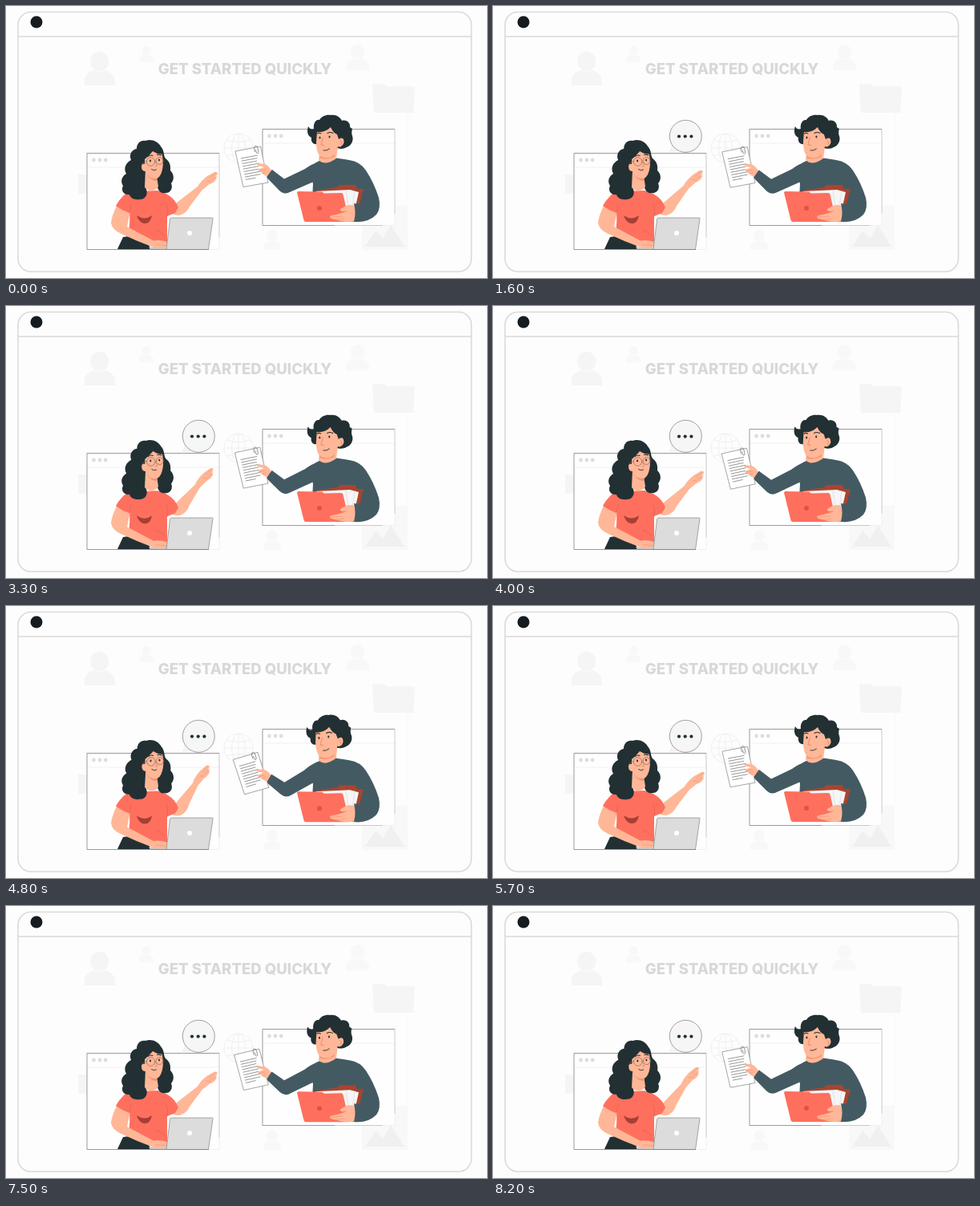
Recreate the animation shown at these times as an HTML page. Size 600 by 339 pixels, loop 8300 ms.

```html
<!DOCTYPE html>
<html lang="en">
<head>
<meta charset="utf-8">
<title>Get started quickly</title>
<style>
  html, body { margin: 0; width: 100%; height: 100%; overflow: hidden; background: #fdfdfd; }
  svg { display: block; width: 600px; height: 339px; }
  .title { font: 800 18.600px Inter, "Open Sans", sans-serif; fill: #d8d8d8; text-anchor: middle; }
  .ghost { fill: #f5f5f5; }
  .hair { fill: #223033; }
  .skin { fill: #ffb797; }
  .red { fill: #ff6f5e; }
  .knit { fill: #435a62; }
  .ink { fill: none; stroke: #263238; stroke-width: .7; stroke-linecap: round; stroke-linejoin: round; }
  .fold { fill: none; stroke: #d95f50; stroke-width: .6; stroke-linecap: round; }
  .shade { fill: none; stroke: #ee9574; stroke-width: .7; stroke-linecap: round; stroke-linejoin: round; }
  .edge { fill: none; stroke: #808080; stroke-width: .8; }
  .pale { fill: none; stroke: #ececec; stroke-width: .8; }
</style>
</head>
<body>
<svg viewBox="0 0 600 339">
  <defs>
    <symbol id="user" viewBox="0 0 40 42" preserveAspectRatio="none">
      <circle cx="20" cy="12" r="12"/>
      <path d="M0 42V35Q2 26 13 23Q20 27 27 23Q38 26 40 35V42Z"/>
    </symbol>
    <g id="pane">
      <rect width="165" height="120" fill="#fefefe"/>
      <path class="pale" d="M0 17.5H165"/>
      <path class="edge" d="M165 0H0V120H90"/>
      <path class="edge" stroke-opacity=".5" d="M90 120H150M165 0V105"/>
      <path class="pale" d="M165 105V120H150"/>
      <g fill="#dedede">
        <circle cx="8.500" cy="8.500" r="2.400"/><circle cx="16" cy="8.500" r="2.400"/><circle cx="23.200" cy="8.500" r="2.400"/>
      </g>
    </g>
  </defs>

  <rect width="600" height="339" fill="#fdfdfd"/>
  <g fill="none" stroke="#dadada" stroke-width="1.600">
    <rect x="15" y="7.500" width="565.500" height="323.500" rx="16"/>
    <path d="M15 38H580"/>
  </g>
  <circle cx="38" cy="20" r="7.500" fill="#151b1f"/>

  <g class="ghost">
    <use href="#user" x="97.500" y="57" width="38.500" height="42"/>
    <path d="M457 99Q457 97 459 97H472L475 100H508Q510 100 510 102L508 133H459Z"/>
    <rect x="90" y="210" width="12" height="24"/>
    <g opacity=".6">
      <use href="#user" x="166" y="50" width="18" height="20"/>
      <use href="#user" x="424" y="48" width="29" height="32"/>
      <use href="#user" x="321" y="279" width="22" height="25"/>
      <rect x="444" y="249" width="57" height="55"/>
    </g>
    <path fill="#f0f0f0" d="M448 300L461 280L470 290L480 273L497 300Z"/>
  </g>
  <path class="pale" opacity=".4" d="M501 133V249"/>
  <g class="pale">
    <circle cx="290" cy="177" r="18"/><ellipse cx="290" cy="177" rx="8.500" ry="18"/>
    <path d="M290 159V195M272 177H308M275 167Q290 172 305 167M275 187Q290 182 305 187"/>
  </g>

  <text class="title" x="298" y="85">GET STARTED QUICKLY</text>

  <use href="#pane" x="101" y="183.500"/>
  <use href="#pane" x="320" y="153.500"/>

  <g id="bubble">
    <path fill="#f5f5f5" stroke="#e2e2e2" stroke-width=".6" d="M223 173Q224 178 220.500 181Q227 182 232 179Z"/>
    <circle cx="240.300" cy="162.300" r="20" fill="#f6f6f6" stroke="#888" stroke-width=".8"/>
    <g class="hair">
      <circle cx="232" cy="162.500" r="2.100"/><circle cx="239.700" cy="162.500" r="2.100"/><circle cx="247.400" cy="162.500" r="2.100"/>
    </g>
  </g>

  <!-- woman -->
  <g>
    <path class="hair" d="M139 303L146 288Q162 285 174 291L181 303Z"/>
    <path d="M178 300.500H202V303.500H180Z" fill="#c8c8c8"/>
    <g id="wave">
      <path class="skin" d="M204 256Q211 263 219 260Q226 257 229 250L245 229L254 222Q262 219 263 214L261 213L264 209Q264 206 260 207L251 212Q243 218 239 225L213 245Z"/>
      <path class="shade" d="M254 214L262 208M256 217L263 212M250 218L255 219"/>
    </g>
    <g id="her">
      <path class="red" d="M164 231Q154 232 149 235L154 257Q155 268 153 282L188 296H201L201 262L211 258L215 251Q211 241 203 236Q198 232 189 230Z"/>
      <path class="skin" d="M139 247Q132 261 131 270Q132 279 144 284Q163 293 182 300Q193 304 201 300V294Q192 291 184 292.500L151 275L155 256Z"/>
      <path class="shade" d="M187 297.500L199 298.500"/>
      <path class="red" d="M156 232Q149 233 145 238Q140 243 137 249Q145 255 154 258L160 240Z"/>
      <path class="fold" d="M154 258L156 247M201 262Q203 254 200 248M198 286Q193 281 187 279"/>
      <path d="M163 261Q173 268 182 261Q180 272 172 271Q166 270 163 261Z" fill="#a63f36"/>
    </g>
    <g id="herHead">
      <path class="hair" d="M174 168C181 165 190 169 193 175C198 180 196 186 199 190C206 195 205 201 205 205C211 211 209 218 206 221C209 228 204 234 198 233C193 234 190 230 189 226L174 226C178 233 175 241 167 241C160 242 155 239 154 235C147 236 143 230 146 224C142 218 145 212 150 209C146 202 150 195 156 192C153 185 157 179 163 178C163 171 168 167 174 168Z"/>
      <path class="skin" d="M174 203L173 226Q177 231 183 230Q188 229 190 225L188 212Z"/>
      <path d="M175 209Q181 217 188 214.500V218Q180 218 175 209Z" fill="#ee9574"/>
      <path class="skin" d="M173 191Q178 187 183 181Q189 185 194.500 184.500Q196.500 192 195.500 201Q194 212 188.500 215Q179 215 174 206Q169 206 169 200Q169 196 173 197Z"/>
      <g class="ink">
        <g stroke="#8c685a">
          <circle cx="180.500" cy="194" r="5.300"/><circle cx="191.500" cy="193" r="4.500"/><path d="M175 193.500L170 196"/>
        </g>
        <path d="M177 187.500Q180 185 183 186.500M188.500 185.500Q191 184.500 193.500 186" stroke-width="1.100"/>
        <path d="M186.500 194L188.500 199.500L186 200" stroke="#d87d60"/>
        <path d="M181.500 203.500Q184 206 187.500 204" stroke-width=".9"/>
      </g>
      <g class="hair"><ellipse cx="180" cy="193" rx="1" ry="1.400"/><ellipse cx="191" cy="192" rx="1" ry="1.400"/></g>
    </g>
    <path d="M200 303.500L204.500 266Q204.800 264 206.500 264H257Q258.500 264 258 265.500L252.500 303.500Z" fill="#dcdcdc" stroke="#858585" stroke-width=".7"/>
    <circle cx="229" cy="283" r="3" fill="#fff"/>
    <path class="edge" d="M180 303.500H253"/>
  </g>

  <!-- man -->
  <path id="him" class="knit" d="M391 193Q383 196 379 204L383 222L382 240L420 268L436 269Q452 270 462 260Q468 252 465 239Q459 220 449 205Q442 194 428 192Q416 190 408 189Z"/>
  <g id="hisHead">
    <path class="skin" d="M391 183L390 192Q398 200 412 190L414 176Z"/>
    <path d="M392 187Q401 191 410 184L409 188Q399 193 391 189Z" fill="#ee9574"/>
    <path class="hair" d="M388 172C383 173 380 169 381 164C376 162 375 156 377 150Q380 155 384 153C383 146 387 141 391 142C394 137 400 135 405 136C412 135 417 139 419 143C425 141 430 146 429 151L432 153C431 157 431 159 432 162C434 167 431 174 425 176C420 179 414 178 411 176Z"/>
    <path class="skin" d="M388 157Q398 158 405 151Q408 158 413 160L415 166Q419 163 421 166Q423 172 418 175Q416 176 414 175Q413 184 405 188.500Q397 191 391 186.500Q387 181 387 170Z"/>
    <g class="ink">
      <path d="M388.500 159Q390 157.500 393 159M401 158.500Q404 156.500 408 158.500" stroke-width="1.100"/>
      <path d="M395.500 164L393 173L396.500 173.500" stroke="#d87d60"/>
      <path d="M396 180Q400 181 403.500 178" stroke-width=".9"/>
      <path d="M417 168Q420 168 418 173" stroke="#d87d60"/>
    </g>
    <g class="hair"><ellipse cx="391.500" cy="164" rx="1" ry="1.500"/><ellipse cx="403.500" cy="163" rx="1" ry="1.500"/></g>
  </g>
  <g id="files">
    <path d="M387 230L413 226L416 223H436L438 228H446L438 258L424 262Z" fill="#a8442f"/>
    <path d="M386 231L429 229L440 232L434 259L424 262Z" fill="#f6f6f6"/>
    <path d="M430 230L435 231L431 258M424 230L428 258" fill="none" stroke="#dcdcdc" stroke-width=".7"/>
    <path class="red" d="M363 232.500Q363 231 365 231L394 231.500L397 233.500L418 233Q420 233 420.500 235L428 267.500Q428 269 426 269H374Q372 269 371.500 267Z"/>
    <circle cx="391" cy="252" r="3" fill="#dd5446"/>
    <path class="skin" d="M436 249Q429 247 424 249L417 253Q416 256 421 256L426 255Q418 259 406 261Q402 263 406 265L418 268Q427 270 436 268Z"/>
    <path class="shade" d="M406 263L420 262M411 266L422 265"/>
    <path class="knit" d="M434 246Q444 248 452 244L458 262Q446 270 434 268.500Q437 258 434 246Z"/>
  </g>
  <g id="offer">
    <path class="knit" d="M391 194Q381 197 373 203L347 215.500L332 204Q327 207 325 213.500L341 230Q347 236 355 231.500L386 218Z"/>
    <path d="M286 181L317.500 175L327 220L296 225.500Z" fill="#fff" stroke="#808080" stroke-width=".7"/>
    <g id="lines" stroke="#777" stroke-width=".7" transform="matrix(.983 -.18 .21 .978 286 181)"></g>
    <path d="M310.500 182L309.500 177Q310 174 312 174.500Q313.500 175 314 177L315 182.500Q314 185 312.500 183L311.500 179" fill="none" stroke="#666" stroke-width=".7"/>
    <path class="skin" d="M331 205Q328 199 323 197L315 196Q312 197 315 199L322 201L316 203Q313 205 317 206L320 209Q323 212 326 212Z"/>
    <path class="shade" d="M317 205L323 204M320 208L324 207"/>
  </g>
</svg>
<script>
  const LOOP = 8300, STEP = 100;
  const $ = id => document.getElementById(id);
  const put = (id, value) => $(id).setAttribute("transform", value);
  const clamp = v => Math.min(1, Math.max(0, v));
  // smooth 0 → 1 → 0 swing
  const swing = (t, period) => (1 - Math.cos(2 * Math.PI * t / period)) / 2;

  $("lines").innerHTML = Array.from({ length: 9 }, (_, i) =>
    `<path d="M5 ${10 + i * 3.4}H${i === 8 ? 18 : 26 - i % 3}"/>`).join("");

  function draw(t) {
    const her = swing(t, 1900);
    const him = t < 1400 ? 0 : swing(t - 1400, 2200);

    put("wave", `rotate(${-12 * her} 217 253)`);
    put("her", `translate(0 ${0.4 * her})`);
    put("herHead", `rotate(${0.8 * her} 180 230)`);

    put("offer", `rotate(${-5.8 * him} 390 214)`);
    put("him", `translate(0 ${0.3 * him})`);
    put("files", `translate(0 ${0.3 * him})`);
    put("hisHead", `rotate(${-2.5 * him} 401 192)`);

    const p = clamp((t - 500) / 600);
    const grow = 1 - (1 - p) ** 2;
    put("bubble", `translate(221 181) scale(${grow}) translate(-221 -181)`);
  }

  function tick() {
    const t = performance.now() % LOOP;
    draw(Math.floor(t / STEP) * STEP);
    requestAnimationFrame(tick);
  }
  tick();
</script>
</body>
</html>
```
